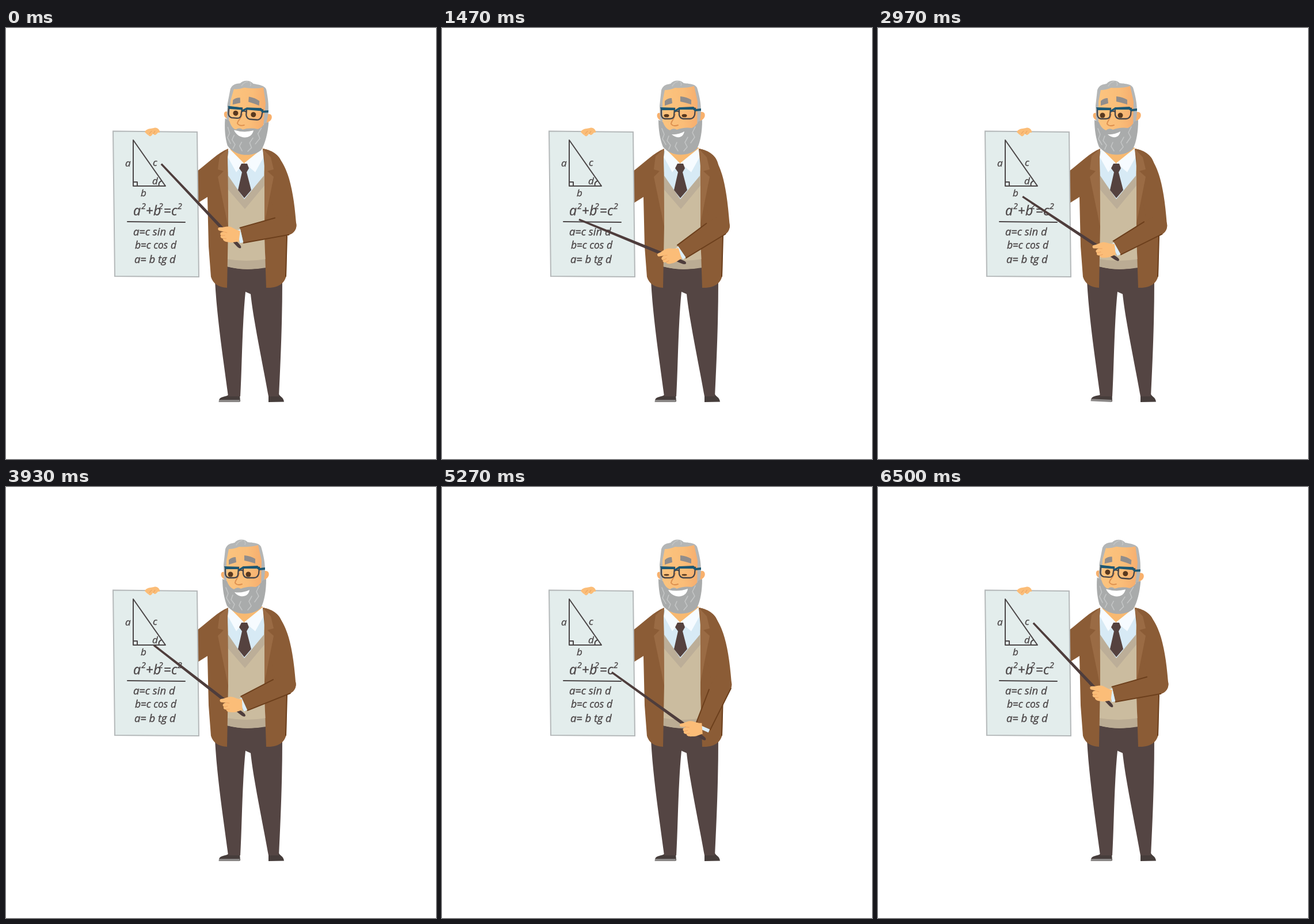
Recreate the animation shown at these times as an HTML page. Size 747 by 750 pixels, loop 6530 ms.

```html
<!DOCTYPE html>
<html lang="en">
<head>
<meta charset="utf-8">
<title>Geometry lesson</title>
<style>
  html, body { margin: 0; width: 100%; height: 100%; overflow: hidden; background: #fff; }
  svg { display: block; width: 747px; height: 750px; }
  text { font-family: "Open Sans", "Noto Sans", sans-serif; font-style: italic; fill: #4c4748; stroke: #4c4748; stroke-width: .35; }
  .ink { fill: none; stroke: #4c4748; stroke-width: 2; stroke-linecap: round; stroke-linejoin: round; }
  .jacket { fill: #8b5c36; }
  .lapel { fill: #9a6b44; }
  .seam { fill: none; stroke: #6c3f1c; stroke-width: 2; stroke-linecap: round; stroke-linejoin: round; }
  .streak { fill: none; stroke: #c3c5c5; stroke-width: 1.6; stroke-linecap: round; stroke-linejoin: round; }
</style>
</head>
<body>
<svg viewBox="0 0 747 750">
  <defs>
    <linearGradient id="skin">
      <stop offset="0" stop-color="#fbc47f"/><stop offset=".6" stop-color="#fabd78"/><stop offset="1" stop-color="#f6ae6f"/>
    </linearGradient>
  </defs>

  <!-- legs and shoes -->
  <g id="foot">
    <path d="M370 649 C370 643 376 642 384 640 L388 637 L406 638 L407 650 Z" fill="#463d3b"/>
    <path d="M370 647 H406 V651 H369.500 Z" fill="#8b8887"/>
  </g>
  <path d="M456 651 V640 L474 637 C476 642 482 642 483 650.500 Z" fill="#463d3b"/>
  <path d="M363 440 L384 414 L452 416 L480 440 C480 510 477 580 474 641 L456 641 C447 590 430 510 425 463 L416 459 C410 520 410 590 407 641 L386 641 C378 580 367 510 363 440 Z" fill="#544543"/>

  <!-- vest and shirt -->
  <path d="M384 215 H450 V416 Q417 424 384 415 Z" fill="#cbbc9f"/>
  <path d="M384 402 Q417 408 452 402 V417 Q417 423 384 415 Z" fill="#bbac94"/>
  <path d="M384 248 L414 296 L449 248 V274 L415 315 L384 279 Z" fill="#bcae98"/>
  <path d="M384 214 L386 257 L414 298 L448 257 L449 214 Z" fill="#d7eaf5"/>
  <path d="M389 208 L392 222 L413 236 L442 222 L446 208 Z" fill="#f8b970"/>
  <path d="M389 211 L413 235 L400 251 L385 224 Z M445 210 L414 235 L433 251 L449 222 Z" fill="#f6fbff"/>
  <path d="M409 236 H419 L422 244 L418 251 H410 L405 244 Z M410 251 H418 L426 282 L414 296 L403 282 Z" fill="#55423f"/>

  <!-- jacket -->
  <path class="jacket" d="M386 210 C368 217 352 234 331 250 V306 L350 294 L352 380 L356 433 C360 446 370 451 384 452 L386 345 L385 225 Z"/>
  <path class="jacket" d="M446 210 C464 213 477 222 480 238 C484 280 488 320 488 362 L487 430 C485 442 476 453 452 452 L449 360 L449 225 Z"/>
  <path class="seam" d="M488 362 L486 432"/>
  <path id="upper" class="jacket"/>
  <path class="lapel" d="M386 210 L371 223 L368 246 L378 249 L368 259 L386 346 L385 225 Z"/>
  <path class="lapel" d="M446 210 L460 225 L465 246 L454 249 L465 259 L449 340 L449 225 Z"/>

  <!-- board -->
  <path d="M186 179.500 L332 181 L335 433 L189 432 Z" fill="#e3edec" stroke="#b5b9ba" stroke-width="2"/>
  <path d="M241 181 C243 175 252 175 257 174 C263 172 268 178 267 182 L264 182 C262 184 260 187 258 186 L255 184 C253 188 250 190 248 187 L245 185 Z" fill="#fbbd78"/>
  <path d="M249 184 L253 179 M256 184 L259 179" fill="none" stroke="#e59d5b"/>
  <path class="ink" d="M221 195 V275 H277 Z M221 268 H228 V275 M270 266 Q264 269 266 275"/>
  <path class="ink" d="M211 337 L311 338"/>
  <g font-size="17">
    <text x="207" y="241">a</text><text x="255" y="240">c</text>
    <text x="234" y="293">b</text><text x="254" y="272">d</text>
  </g>
  <g font-size="23">
    <text x="221" y="326">a</text><text x="243" y="326">+</text><text x="256" y="326">b</text>
    <text x="274" y="326">=</text><text x="287" y="326">c</text>
  </g>
  <g font-size="14">
    <text x="235" y="315">2</text><text x="265" y="315">2</text><text x="298" y="315">2</text>
  </g>
  <text x="221" y="361" font-size="18.500">a=c sin d</text>
  <text x="224" y="384" font-size="17.500">b=c cos d</text>
  <text x="223" y="409" font-size="18.500">a= b tg d</text>

  <!-- head -->
  <g id="head">
    <path d="M382 150 C373 143 371 155 377 159 L384 164 Z M446 148 C457 141 460 154 453 159 L446 164 Z" fill="#f8b06c"/>
    <path d="M379 165 L378 135 L381 108 C384 99 391 98 397 97 C403 90 414 90 420 96 C432 97 443 98 444 107 C447 118 450 130 450 146 L448 165 Z" fill="#b4b6b6"/>
    <path class="streak" d="M400 101 Q404 94 410 93 M415 100 Q417 97 414 94"/>
    <path d="M383 180 L383 128 L387 108 Q396 108 405 104 Q425 105 438 101 L444 128 L443 180 Z" fill="url(#skin)"/>
    <path d="M376 160 L384 164 C386 170 390 176 396 178 Q402 173 408 177 Q420 172 434 174 C441 171 443 166 445 163 L452 160 C452 180 449 198 443 210 C430 223 400 226 384 207 C379 194 376 178 376 160 Z" fill="#a9abab"/>
    <path class="streak" d="M382 175 L386 185 L383 193 L389 203 M394 188 L391 196 L397 204 L394 211 M440 172 L435 182 L439 190 L432 200 M427 190 L422 199 L426 207 L420 214 M408 199 L405 206 L410 214"/>
    <path id="mouth" fill="#fff"/>
    <path d="M387 127 Q392 122 399 122 L400 131 L387 135 Z M414 119 Q425 120 433 125 L433 133 Q424 130 414 128 Z" fill="#918d8b"/>
    <g fill="#59391f"><ellipse id="eyeL" rx="4.500"/><ellipse id="eyeR" rx="4.500"/></g>
    <path d="M405 150 C404 158 398 162 398 167 Q402 172 410 169" fill="none" stroke="#de9150" stroke-width="2" stroke-linecap="round"/>
    <path d="M381 140 H404 L403 153 Q402 158 396 158 H387 Q382 157 381 151 Z M412 140 H440 L439 151 Q437 158 431 158 H419 Q413 157 412 151 Z M404 146 Q408 143 412 146" fill="none" stroke="#46464a" stroke-width="2.300"/>
    <path d="M379 138 L404 139 V143 H381 Z M404 143 L412 138 L437 137 L441 141 L450 140 V144 L440 145 L436 142 H412 L404 146 Z" fill="#1d5873"/>
  </g>

  <!-- pointing arm -->
  <path id="stick" d="M-169 -1.800 L24 -3 Q32 -3 32 0 Q32 3 24 3 L-169 1.500 Z" fill="#4e3d3c"/>
  <path id="fore" class="jacket"/>
  <path id="seams" class="seam"/>
  <path id="cuff" fill="none" stroke="#dceefa" stroke-width="6"/>
  <g id="hand">
    <path d="M20 -9 C11 -9 7 -14 0 -14 C-6 -14 -10 -11 -16 -11 C-20 -10 -19 -5 -15 -5 L-8 -4 C-14 -3 -15 1 -12 3 C-14 6 -11 8 -8 8 C-8 12 -3 13 1 13 C9 14 13 11 20 10 Z" fill="#fbbd78"/>
    <path d="M-8 -4 L-2 -3 M-12 3 L-5 2 M-8 8 L-2 7" fill="none" stroke="#eda261"/>
  </g>
</svg>
<script>
const LOOP = 6530;
const $ = id => document.getElementById(id);
const set = (id, attrs) => { for (const k in attrs) $(id).setAttribute(k, attrs[k]); };

// time, pointer tip x, tip y, pointer angle in degrees
const pointer = [
  [0, 269, 236, 46.6], [30, 269, 236, 46.6],
  [430, 223, 233, 44.4], [820, 223, 233, 44.4],
  [1320, 237, 333, 22.3], [2050, 237, 333, 22.3],
  [2500, 246, 286, 33], [2850, 246, 286, 33],
  [3300, 270, 325, 36], [3600, 270, 325, 36],
  [3930, 256, 275, 37.8],
  [4150, 260, 240, 45], [4750, 260, 240, 45],
  [5200, 294, 322, 35.7], [6040, 294, 322, 35.7],
  [6480, 269, 236, 46.6], [LOOP, 269, 236, 46.6]
];
const turn = [[0, 1], [30, 1], [420, 0], [5850, 0], [6400, 1], [LOOP, 1]];
const smile = [[0, 1], [30, 1], [430, 0], [2100, 0], [2500, .3], [2900, 0], [3500, 0], [4600, 1], [LOOP, 1]];
const blinks = [1410, 3350, 5300];
const taps = [[250, 1050], [2370, 3570], [5670, 6470]];

// Monotone cubic through the keys: smooth, with no overshoot at holds.
function track(keys, t, c = 1) {
  const slope = i => keys[i + 1] && keys[i] ? (keys[i + 1][c] - keys[i][c]) / (keys[i + 1][0] - keys[i][0]) : 0;
  const tangent = i => {
    const a = slope(i - 1), b = slope(i);
    return a * b <= 0 ? 0 : 2 * a * b / (a + b);
  };
  let i = 0;
  while (i < keys.length - 2 && keys[i + 1][0] <= t) i++;
  const [p, q] = [keys[i], keys[i + 1]], d = q[0] - p[0], u = (t - p[0]) / d;
  const s = u * u * (3 - 2 * u);
  return p[c] + (q[c] - p[c]) * s + d * u * (1 - u) * ((1 - u) * tangent(i) - u * tangent(i + 1));
}

const SHOULDER = [460, 243], UPPER = 104, FORE = 83, GRIP = 170, SLEEVE = 17;

function findElbow(wx, wy) {
  const [sx, sy] = SHOULDER, dx = wx - sx, dy = wy - sy;
  const d = Math.min(Math.hypot(dx, dy), UPPER + FORE - .1);
  const along = (UPPER ** 2 - FORE ** 2 + d * d) / (2 * d);
  const out = Math.sqrt(Math.max(0, UPPER ** 2 - along ** 2));
  return [sx + (dx * along + dy * out) / d, sy + (dy * along - dx * out) / d];
}

function drawArm(t) {
  const [tx, ty, deg] = [1, 2, 3].map(c => track(pointer, t, c));
  const a = deg * Math.PI / 180, h = (deg - 40) * Math.PI / 180;
  const gx = tx + GRIP * Math.cos(a), gy = ty + GRIP * Math.sin(a);
  const wx = gx + 21 * Math.cos(h), wy = gy + 21 * Math.sin(h);
  const [ex, ey] = findElbow(wx, wy);
  const len = Math.hypot(ex - wx, ey - wy), ux = (ex - wx) / len, uy = (ey - wy) / len;
  // point on the forearm: distance from the wrist, offset towards the underside
  const at = (s, n) => `${(wx + ux * s - uy * n).toFixed(2)} ${(wy + uy * s + ux * n).toFixed(2)}`;
  // half width of the upper sleeve, across its axis
  const px = (ey - SHOULDER[1]) / UPPER * SLEEVE, py = (SHOULDER[0] - ex) / UPPER * SLEEVE;

  set('stick', { transform: `translate(${gx} ${gy}) rotate(${deg})` });
  set('hand', { transform: `translate(${gx} ${gy}) rotate(${deg - 40})` });
  set('upper', { d: `M446 210 C480 214 ${ex + 10} 255 ${ex + px} ${ey + py} A17 17 0 0 1 ${ex - px} ${ey - py} L450 250 Z` });
  set('cuff', { d: `M${at(0, -11)} L${at(0, 12)}` });
  set('fore', { d: `M${at(3, -14)} L${at(66, -SLEEVE)} L${at(len, -SLEEVE)} A17 17 0 0 1 ${at(len, SLEEVE)} L${at(3, 13)} Z` });
  set('seams', { d: `M${at(3, -14)} L${at(66, -SLEEVE)} M${at(3, 13)} L${at(len, SLEEVE)}` });
}

function drawHead(t) {
  const r = track(turn, t), m = track(smile, t);
  const shut = Math.max(0, ...blinks.map(b => 1 - Math.abs(t - b) / 100));
  const lid = Math.min(1, shut * 1.3);
  set('head', { transform: `rotate(${4.7 * r} 412 215)` });
  const cy = 152 - 2.5 * r + lid, ry = 4.5 - 3.3 * lid;
  set('eyeL', { cx: 390 + 3.5 * r, cy, ry });
  set('eyeR', { cx: 421 + 3.5 * r, cy, ry });
  const x1 = 399 - 6 * m, y1 = 185 - 6 * m, x2 = 421 + 6 * m, y2 = 180 - 3 * m, low = 193 + 2 * m;
  set('mouth', { d: `M${x1} ${y1} Q411 ${186 - 3 * m} ${x2} ${y2} C${x2 - 2} ${low - 1} ${x1 + 8} ${low} ${x1} ${y1} Z` });
}

function drawFoot(t) {
  const tap = taps.find(([from, to]) => t >= from && t <= to);
  const lift = tap ? 3 * Math.sin(Math.PI * (t - tap[0]) / 400) ** 2 : 0;
  set('foot', { transform: `rotate(${lift} 405 650)` });
}

const start = performance.now();
function frame() {
  const t = (performance.now() - start) % LOOP;
  drawArm(t);
  drawHead(t);
  drawFoot(t);
  requestAnimationFrame(frame);
}
frame();
</script>
</body>
</html>
```
